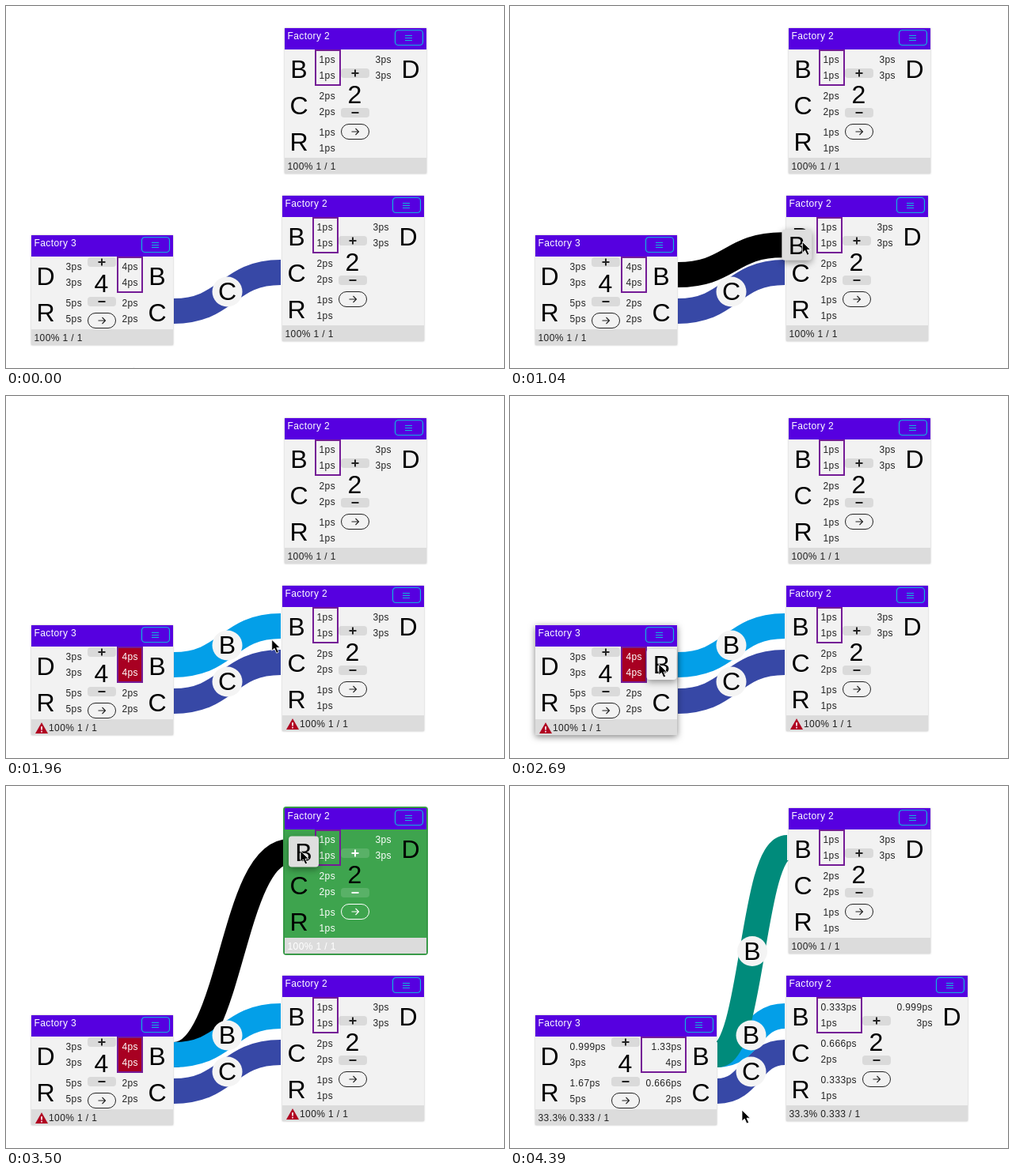
An HTML page for the animation above (4.47 s loop, 629x458 px).

```html
<!DOCTYPE html>
<html lang="en">
<head>
<meta charset="utf-8">
<title>Factory planner</title>
<style>
  html, body { margin: 0; width: 100%; height: 100%; overflow: hidden; background: #fff; }
  svg { display: block; width: 629px; height: 458px; }
  text { font: 12px "Liberation Sans", Arial, sans-serif; letter-spacing: .4px; fill: #222; }
  .big { font-size: 32px; letter-spacing: 0; text-anchor: middle; fill: #000; }
  .end { text-anchor: end; }
  .light { fill: #fff; }
  .card { filter: drop-shadow(0 0 1px rgba(0,0,0,.28)); }
  .hover { filter: drop-shadow(0 2px 4px rgba(0,0,0,.5)); }
  .tile { filter: drop-shadow(0 3px 4px rgba(0,0,0,.4)); }
</style>
</head>
<body>
<svg id="stage" viewBox="0 0 629 458"></svg>
<script>
const LOOP = 4470, STEP = 80;
const DRAG_1 = 640, DROP_1 = 1460, DRAG_2 = 2860, DROP_2 = 3750;
const OVER_STEPS = 7 * STEP; // a card turns green this long before the drag settles

// Pointer gestures: each bends from the previous rest point past `via` to `to`
const gestures = [
  { start: 0, steps: 1, via: [161, 457], to: [161, 457] },
  { start: 80, steps: 6, via: [185, 372], to: [199, 335] },
  { start: DRAG_1, steps: 8, via: [367, 293], to: [376, 299] },
  { start: DROP_1, steps: 4, via: [358, 304], to: [340, 307] },
  { start: 1960, steps: 10, via: [264, 330], to: [188, 339] },
  { start: DRAG_2, steps: 9, via: [320, 150], to: [372, 82] },
  { start: DROP_2, steps: 9, via: [279, 344], to: [293, 410] }
];

const within = (t, a, b) => t >= a && t < b;
const smooth = p => p * p * (3 - 2 * p);

function pointerAt(t) {
  const i = gestures.findLastIndex(g => t >= g.start);
  const { start, steps, via, to } = gestures[i];
  const from = i ? gestures[i - 1].to : to;
  const step = Math.floor((t - start) / STEP) + 1;
  const u = smooth(Math.min(1, step / steps)), v = 1 - u;
  return to.map((end, k) => v * v * from[k] + 2 * u * v * via[k] + u * u * end);
}

const rect = (x, y, w, h, fill, extra = '') =>
  `<rect x="${x}" y="${y}" width="${w}" height="${h}" fill="${fill}" ${extra}/>`;
const text = (x, y, s, cls = '') => `<text x="${x}" y="${y}" class="${cls}">${s}</text>`;
const line = (d, color, width) =>
  `<path d="${d}" fill="none" stroke="${color}" stroke-width="${width}"/>`;
const letter = (x, y, s) => text(x, y + 10.8, s, 'big');

function tube(x1, y1, x2, y2, color) {
  const m = (x1 + x2) / 2;
  return line(`M${x1} ${y1}C${m} ${y1} ${m} ${y2} ${x2} ${y2}`, color, 32);
}

function badge(x1, y1, x2, y2, s) {
  const x = (x1 + x2) / 2, y = (y1 + y2) / 2;
  return `<circle cx="${x}" cy="${y}" r="19" fill="#f4f4f4"/>` + letter(x, y, s);
}

const tile = (x, y, fill) =>
  `<g class="tile">${rect(x - 19, y - 19.5, 38, 39, fill, 'rx="4"')}</g>` + letter(x, y + 1, 'B');

function rates(x, row, pair, cls) {
  return pair.map((v, i) => text(x, 44 + row * 46 + i * 20, v + 'ps', cls)).join('');
}

function controls(cx, y, count, green) {
  const ink = green ? '#fff' : '#222', fill = green ? 'rgba(255,255,255,.14)' : '#dadada';
  const button = top => rect(cx - 18, top, 36, 12, fill, 'rx="4"');
  return button(y) + line(`M${cx - 4.5} ${y + 6}h9M${cx} ${y + 1.5}v9`, ink, 2) +
    letter(cx - .5, y + 33, count) +
    button(y + 50) + line(`M${cx - 4.5} ${y + 56}h9`, ink, 2) +
    rect(cx - 17.5, y + 70.5, 35, 19, 'none', `rx="9.5" stroke="${ink}"`) +
    line(`M${cx - 4.5} ${y + 80}h9m-4 -4l4 4l-4 4`, ink, 1.1);
}

function warning(y) {
  return `<path d="M13 ${y}L21 ${y + 14}H5Z" fill="#b00020"/>` +
    line(`M13 ${y + 5}v4.5m0 1.3v1.7`, '#fff', 1.6);
}

function card(c, px, py, dragging) {
  const { x, y, h, green } = c;
  const w = c.low ? 229 : 179, box = c.low ? 56 : 31;
  const boxX = c.boxRight ? w - 39 - box : 39;
  const pale = green ? 'light' : '';
  const hover = !dragging && within(px, x, x + w) && within(py, y, y + h);
  let s = green ? rect(-2, -2, w + 4, h + 4, '#3ea44e', 'rx="4"') : '';
  s += `<g class="${hover ? 'hover' : 'card'}">${rect(0, 0, w, h, green ? '#3ea44e' : '#f2f2f2')}</g>`;
  s += rect(0, 0, w, 27, '#5600e0') + text(3.5, 14, c.name, 'light');
  s += rect(w - 39.5, 2.5, 35, 19, 'none', 'rx="4" stroke="#10b5dc" stroke-width="1.2"');
  s += line(`M${w - 27} 9.5h9m-9 3h9m-9 3h9`, '#10b5dc', 1);
  s += rect(0, h - 20, w, 20, '#dcdcdc');
  if (c.warn) s += warning(h - 16);
  s += text(c.warn ? 22 : 3.5, h - 5.5, c.low ? '33.3% 0.333 / 1' : '100% 1 / 1', pale);
  s += rect(boxX, 28, box, 44, c.alert ? '#a80022' : 'none', 'stroke="#741b96" stroke-width="2"');
  const pair = ([, scaled, full]) => [c.low ? scaled : full, full];
  c.inputs.forEach((item, i) => {
    s += letter(18, 52 + i * 46, item[0]) + rates(43.5, i, pair(item), pale);
  });
  c.outputs.forEach((item, i) => {
    s += letter(w - 20, 52 + i * 46, item[0]);
    s += rates(w - 44, i, pair(item), 'end ' + (c.alert && i === 0 ? 'light' : pale));
  });
  s += controls((w - 1) / 2, c.inputs.length * 23 - 18, c.count, green);
  if (hover && c.grab && px > x + w - 39 && within(py, y + 29, y + 69)) s += tile(w - 19.5, 49.5, '#f2f2f2');
  return `<g transform="translate(${x} ${y})">${s}</g>`;
}

const receiver = {
  name: 'Factory 2', h: 184, count: 2,
  inputs: [['B', 0.333, 1], ['C', 0.666, 2], ['R', 0.333, 1]],
  outputs: [['D', 0.999, 3]]
};

const sender = {
  name: 'Factory 3', x: 32, y: 290, h: 139, count: 4, boxRight: true, grab: true,
  inputs: [['D', 0.999, 3], ['R', 1.67, 5]],
  outputs: [['B', 1.33, 4], ['C', 0.666, 2]]
};

const pointer = (x, y) =>
  `<path transform="translate(${x} ${y})" d="M0 0V14L3.3 11L6 17L8.6 15.8L6 10.2H10.3Z" ` +
  `fill="#000" stroke="#fff" stroke-width=".8"/>`;

function scene(t) {
  const [px, py] = pointerAt(t);
  const first = within(t, DRAG_1, DROP_1), second = within(t, DRAG_2, DROP_2);
  const dragging = first || second, linked = t >= DROP_1, low = t >= DROP_2;
  const alert = linked && !low;
  const tx = px + (first ? -7 : 4), ty = py + (first ? 4 : 1);
  const sx = low ? 262 : 212;

  const links = [['C', '#3748a6', sx, 386, 347, 337]];
  if (linked) links.push(['B', '#039fe8', sx, 340, 347, 291]);
  if (low) links.push(['B', '#008b7b', sx, 340, 350, 78]);

  const cards = [
    { ...receiver, x: 352, y: 28, green: second && t >= DRAG_2 + OVER_STEPS - STEP },
    { ...receiver, x: 349, y: 240, low, green: first && t >= DRAG_1 + OVER_STEPS - STEP, warn: alert },
    { ...sender, low, alert, warn: alert }
  ];

  return (dragging ? tube(sx, 340, tx - 18, ty, '#000') : '') +
    links.map(([, color, ...ends]) => tube(...ends, color)).join('') +
    links.map(([name, , ...ends]) => badge(...ends, name)).join('') +
    cards.map(c => card(c, px, py, dragging)).join('') +
    (dragging ? tile(tx, ty, '#dedede') : '') +
    pointer(px, py);
}

const stage = document.getElementById('stage');
let shown = '';

function draw() {
  const next = scene(performance.now() % LOOP);
  if (next !== shown) stage.innerHTML = shown = next;
  requestAnimationFrame(draw);
}
draw();
</script>
</body>
</html>
```
